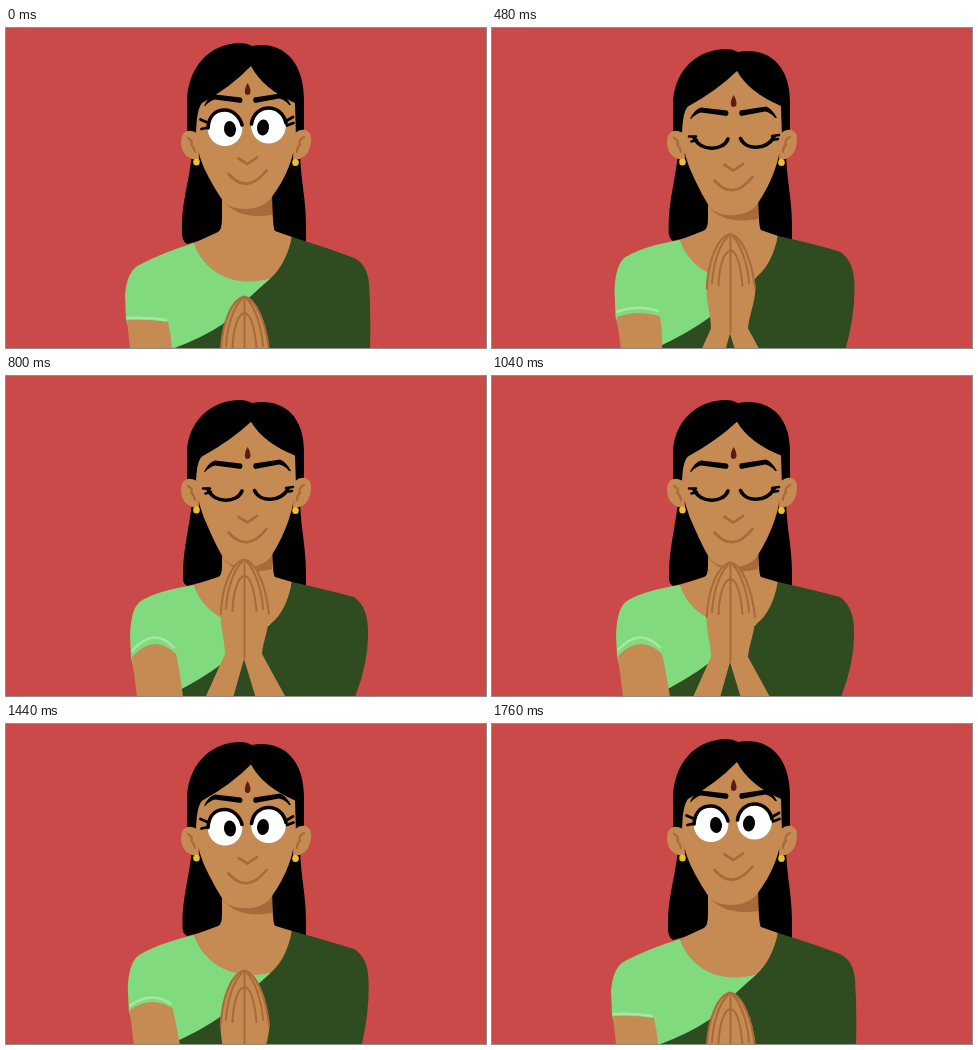
Animation, 480 px wide and 320 px high, one loop 2080 ms. Source, as an HTML page:

```html
<!DOCTYPE html>
<html lang="en">
<head>
<meta charset="utf-8">
<title>Greeting</title>
<style>
html, body { margin: 0; width: 100%; height: 100%; overflow: hidden; background: #c94a49; }
svg { display: block; width: 100vw; height: 100vh; }
.line { fill: none; stroke-linecap: round; stroke-linejoin: round; }
</style>
</head>
<body>
<svg id="stage" viewBox="0 0 480 320" preserveAspectRatio="xMidYMid meet"></svg>
<script>
const NS = 'http://www.w3.org/2000/svg';
const stage = document.getElementById('stage');
const LOOP = 2080;
const SKIN = '#c68a53', BROWN = '#a86a3b', INK = '#000', LEAF = '#82da7e',
      MOSS = '#2e4c20', HEM = '#a6e8a2', GOLD = '#ecbf30', DOT = '#5e1a1b';

function add(parent, tag, attrs) {
  const el = document.createElementNS(NS, tag);
  for (const key in attrs) el.setAttribute(key, attrs[key]);
  parent.appendChild(el);
  return el;
}
const group = parent => add(parent, 'g', {});
const fill = (parent, color, d = '') => add(parent, 'path', { fill: color, d });
const line = (parent, color, width, d = '') =>
  add(parent, 'path', { class: 'line', stroke: color, 'stroke-width': width, d });
const oval = (parent, color, cx, cy, rx, ry, turn = 0) =>
  add(parent, 'ellipse', { fill: color, cx, cy, rx, ry, transform: `rotate(${turn} ${cx} ${cy})` });
const shift = (el, y) => el.setAttribute('transform', `translate(0 ${y})`);
const draw = (el, d) => el.setAttribute('d', d);

// Layers, back to front
add(stage, 'rect', { width: 480, height: 320, fill: '#c94a49' });
const locks = fill(stage, INK);
const neck = fill(stage, SKIN);
const shade = fill(stage, BROWN);
const blouse = fill(stage, LEAF);
const sari = fill(stage, MOSS);
const arm = fill(stage, SKIN);
const hem = line(stage, HEM, 2.5);
const face = fill(stage, SKIN);
const hair = fill(stage, INK);

// Ears and earrings
fill(stage, SKIN, 'M192 106C184 100 175 102 175 114C175 126 183 132 193 132Z');
fill(stage, SKIN, 'M288 106C295 99 306 100 305 113C304 126 297 132 287 132Z');
line(stage, BROWN, 2.2, 'M182 110Q187 112 185.500 117Q188 119 189 124');
line(stage, BROWN, 2.2, 'M298 109Q292 112 294 117Q291 119 291 124');
oval(stage, GOLD, 190.5, 134, 3.3, 3.6);
oval(stage, GOLD, 289.5, 134.5, 3.3, 3.6);

const bindi = fill(stage, DOT, 'M241.500 55C243.500 58 244.500 61 244.500 64Q244 67 241.500 67Q239 67 238.800 64C238.800 61 240 58 241.500 55Z');
const brows = group(stage);
fill(brows, INK, 'M198 78Q202 68.500 209 66.500L235 69.500Q238 72 235 75L209 71.500Q204 72.500 199 78Z');
fill(brows, INK, 'M248 69.500L274 65.500Q280 67.500 285 77L283 77Q279 71.500 273 70.500L249 75Q246 73 248 69.500Z');

const mouth = group(stage);
line(mouth, BROWN, 2.7, 'M232.500 130.500L241.500 136L251 129.500');
line(mouth, BROWN, 2.7, 'M222.500 146Q241 167 260.500 142.500');

const open = group(stage);
oval(open, '#fff', 219, 100.5, 17.3, 17.6);
oval(open, '#fff', 262.5, 98, 17.3, 17.6);
oval(open, INK, 224, 101, 6, 8, -6);
oval(open, INK, 257, 99.5, 6, 8, 6);
line(open, INK, 3.6, 'M202 100C203 86 211 82 219 82C227 82 234 89 236 97');
line(open, INK, 3.6, 'M245.500 96C247 85 255 80 263 80C271 80 278 86 280 95');
line(open, INK, 2.8, 'M194.500 91.500L202.500 95M195.500 101L202 99.500M280 93L287 89M281 97.500L287.500 95');

const shut = group(stage);
line(shut, INK, 3.6, 'M202 103C208 117 231 117 236 104.500');
line(shut, INK, 3.6, 'M248.500 104C254 116 274 116 282 102.500');
line(shut, INK, 2.6, 'M197 102H204M199.500 107L205 105.500M280 101.500L287 100.500M280 105.500L286 104.500');

// Joined hands, fingertips at y = 0
const hands = group(stage);
fill(hands, SKIN, 'M238 0C226 3 216 25 214.500 52C214 70 219 82 219 95L196 146H225L238 100L252 146H284L256 95C257 82 263 70 263.500 54C261 27 251 3 238 0Z');
line(hands, BROWN, 2, 'M214.800 55C216 27 226 3 238 .5C251 3 260 28 263 55');
line(hands, BROWN, 1.9, 'M238.500 2V99');
line(hands, BROWN, 2, 'M220 50C221 32 227 11 236 3M257 50C256 32 249 11 241 3');
line(hands, BROWN, 2, 'M226.500 52C227 36 231 18 238.500 17C246 18 249 36 250.500 52');

// start, crown, face, brows, bindi, fingertips, left and right shoulder,
// sleeve edge (left, middle, right), arm foot, bow
const poses = [
  [0, 0, 0, 0, 0, 268, 215, 209, 292, 292, 294, 166, 0],
  [320, 0, -1, -3, -2, 260, 215, 211, 295, 291, 294, 168, .2],
  [480, 6, 6.5, 13, 12, 205.5, 212, 208, 289, 285, 288, 170, .7],
  [640, 8, 9, 17, 15, 189, 210, 207, 283, 275, 281, 174, .9],
  [800, 9, 10.5, 18, 16, 183, 209, 206, 281, 268, 278, 177, 1],
  [1040, 9, 10.5, 18, 16, 186, 209, 206, 280, 268, 278, 178, 1],
  [1280, 9, 10.5, 17.5, 16, 201, 210, 206, 280, 268, 279, 180, .97],
  [1440, 3, 3.5, 4, 2, 246, 211, 207, 286, 278, 284, 174, .55],
  [1600, 2, 2, 2, 1, 259, 213, 208, 290, 287, 289, 169, .25]
];

function poseAt(t) {
  if (t >= 1760) return poses[0];
  return poses.filter(p => p[0] <= t).pop();
}

function render(t) {
  const [start, crown, drop, brow, dot, tip, sl, sr, hl, hm, hr, foot, k] = poseAt(t);
  const closed = start >= 480 && start < 1440;
  const lift = sl - 215;
  const hx = 121 + 5 * k, rx = 162 + 8 * k;
  const corner = 250 + lift * .4;
  const neckline = `C196 ${240 + lift} 224 ${262 + lift} 265 ${corner}`;

  draw(locks, `M186 125C183 155 ${176 + k} 172 ${176 + k} 200Q${175 + k} ${213 + lift} 181 ${216 + lift}L216 ${207 + lift}V125Z
    M294 125C295 155 300 170 300 198V${214 + lift / 2}H266V125Z`);
  draw(neck, `M216 150V190Q216 ${202 + lift / 3} 212 ${204 + lift / 2}L188 ${sl}${neckline}Q282 234 286 ${sr}L269 ${203 + lift / 3}Q266 200 266 150Z`);
  draw(shade, `M216 ${171 + drop}C227 ${187 + drop * .8} 245 ${190 + drop * .7} 266 ${187 + drop * .6}V150H216Z`);

  draw(blouse, `M188 ${sl}Q${158 - 8 * k} ${224 - 9 * k} ${133 + 2 * k} ${237 - 12 * k}Q${121 + 4 * k} ${243 - 12 * k} ${119 + 5 * k} ${267 - 8 * k}
    L${hx - 1} ${hl}L${hx + 8} 321H230L265 ${corner}C224 ${262 + lift} 196 ${240 + lift} 188 ${sl}Z`);
  draw(sari, `M286 ${sr}Q322 ${220 - 6 * k} 348 ${230 - 9 * k}Q${361 + k} ${236 - 5 * k} ${363 - k} 255Q${365 - 2 * k} 285 ${364 - 15 * k} 321
    H164L166 ${321 - 3 * k}Q196 ${310 - 7 * k} 217 ${296 - 9 * k}Q234 277 265 ${corner}Q280 236 286 ${sr}Z`);

  const cy = 2 * hm - (hl + hr) / 2, up = 2 + 4.5 * k;
  draw(arm, `M${hx} ${hl}Q${(hx + rx) / 2} ${cy} ${rx} ${hr}Q${rx + 3} ${hr + 12} ${foot} 321H${124 + 7 * k}Z`);
  draw(hem, `M${hx + .5} ${hl - up}Q${(hx + rx) / 2} ${cy - up} ${rx - 2} ${hr - up}`);

  draw(face, `M190 ${85 + crown / 2}V106Q191 129 203 ${150 + drop * .3}Q210 ${163 + drop * .6} 217 ${173 + drop * .8}
    C226 ${184 + drop} 255 ${184 + drop} 265 ${170 + drop}Q288 ${140 + drop * .4} 290 106V70L245 35L196 70Z`);
  draw(hair, `M181 106V${75 + crown * .3}C181 ${40 + crown * .8} 203 ${15 + crown} 235 ${15 + crown}Q241 ${15 + crown} 246 ${18 + crown}
    C272 ${13 + crown} 299 ${28 + crown * .8} 298 ${75 + crown * .3}V105L290 110L289 ${75 + crown * .5}
    Q257 ${61 + crown * .6} 245 ${38 + crown * .85}Q225 ${59 + crown * .6} 196 ${75 + crown * .6}Q190 ${82 + crown * .4} 190 110Z`);

  shift(bindi, dot);
  shift(brows, brow);
  shift(mouth, drop);
  shift(open, drop);
  shift(shut, drop);
  shift(hands, tip);
  open.style.display = closed ? 'none' : '';
  shut.style.display = closed ? '' : 'none';
}

const began = performance.now();
function tick() {
  render((performance.now() - began) % LOOP);
  requestAnimationFrame(tick);
}
tick();
</script>
</body>
</html>
```
